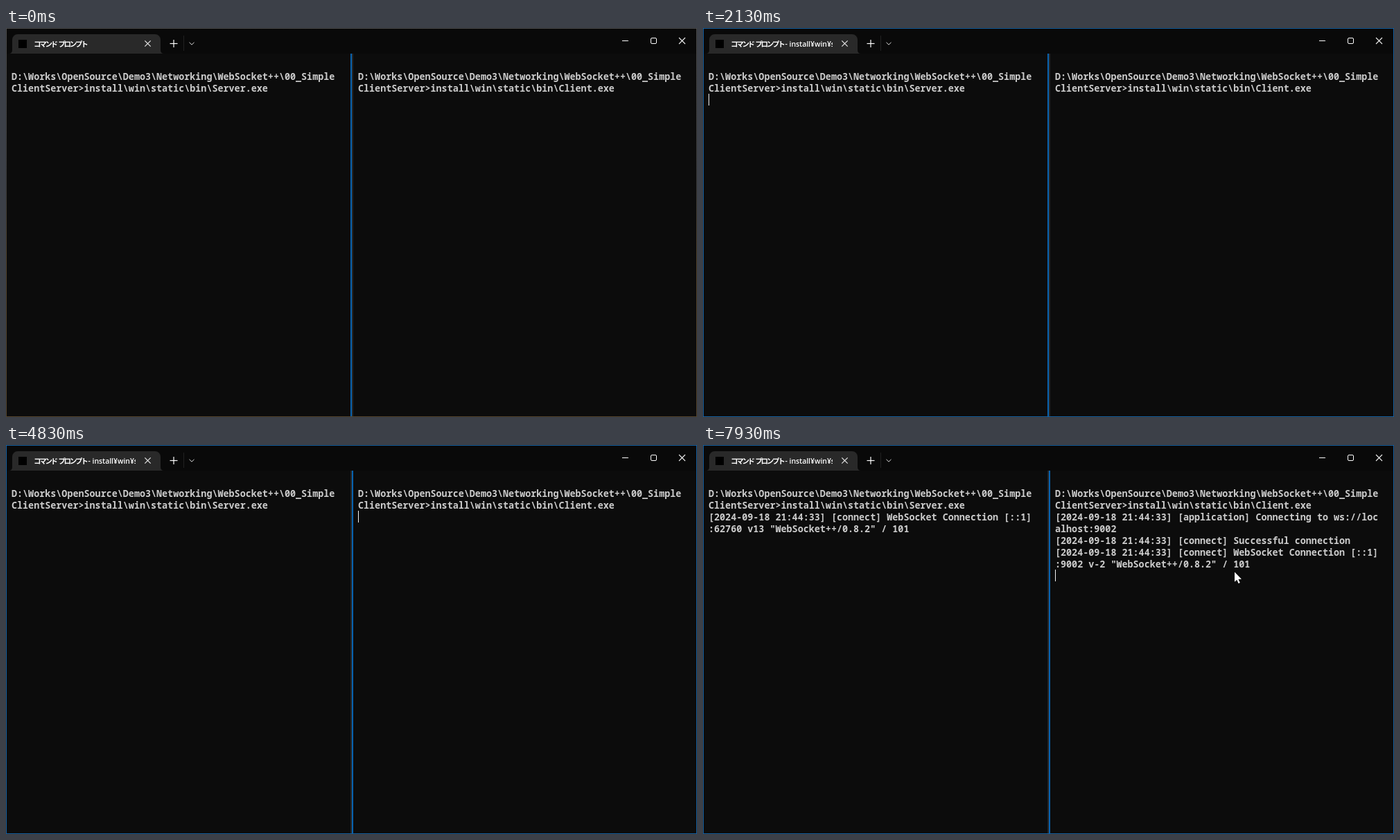
Write an HTML page with a canvas that moves like this. It is 997x562 px and loops after 8000 ms.

```html
<!DOCTYPE html>
<html lang="ja">
<head>
<meta charset="utf-8">
<title>Terminal</title>
<style>
  html, body { margin: 0; width: 100%; height: 100%; overflow: hidden; background: #0c0c0c; }
  canvas { display: block; }
</style>
</head>
<body>
<canvas id="stage" width="997" height="562"></canvas>
<script>
const W = 997, H = 562, LOOP = 8000;
const PITCH = 8.04, ROW = 17, TOP = 61;
const LEFT = 8, RIGHT = 508;
const MONO = '600 13.4px "Noto Sans Mono", "DejaVu Sans Mono", monospace';
const KANA = '700 10.5px "Noto Sans CJK JP", "Noto Sans CJK", sans-serif';
const LATIN = '600 10.4px "Open Sans", "Noto Sans", sans-serif';
const BLUE = '#0863b0', DIM = '#262626';

// Moments of the story, in ms
const FOCUS = 1310, RUN_SERVER = 2130, SWITCH = 3710, RUN_CLIENT = 4830, CONNECTED = 4920;
const BLINK = 540;

const ctx = document.getElementById('stage').getContext('2d');

const prompt = exe => [
  'D:\\Works\\OpenSource\\Demo3\\Networking\\WebSocket++\\00_Simple',
  'ClientServer>install\\win\\static\\bin\\' + exe
];
const stamp = '[2024-09-18 21:44:33] ';
const serverLog = [
  stamp + '[connect] WebSocket Connection [::1]',
  ':62760 v13 "WebSocket++/0.8.2" / 101'
];
const clientLog = [
  stamp + '[application] Connecting to ws://loc',
  'alhost:9002',
  stamp + '[connect] Successful connection',
  stamp + '[connect] WebSocket Connection [::1]',
  ':9002 v-2 "WebSocket++/0.8.2" / 101'
];
const cmdEnd = prompt('Server.exe')[1].length;

// Each glide eases out in even steps, may click, then hides
const glides = [
  { start: 590, end: 1090, steps: 5, from: [408, 480], to: [375.5, 57], click: FOCUS, release: 1500, hide: RUN_SERVER },
  { start: 3210, end: 3520, steps: 3, from: [442.5, 57], to: [654, 72.5], click: SWITCH, release: 3810, hide: RUN_CLIENT },
  { start: 7450, end: 7930, steps: 5, from: [668, 112], to: [767, 183.5], hide: LOOP }
];

// The caret stays lit for `hold` after each input, then blinks
const carets = [
  { start: FOCUS, pane: LEFT, col: cmdEnd, row: 1, hold: 600 },
  { start: RUN_SERVER, pane: LEFT, col: 0, row: 2, hold: 680 },
  { start: SWITCH, pane: RIGHT, col: cmdEnd, row: 1, hold: 500 },
  { start: RUN_CLIENT, pane: RIGHT, col: 0, row: 2, hold: 680 },
  { start: CONNECTED, pane: RIGHT, col: 0, row: 7, hold: 690 },
  { start: 7930, pane: RIGHT, col: 0, row: 7, hold: 680 }
];

const between = (t, a, b) => t >= a && t < b;

function rect(x, y, w, h, color) {
  ctx.fillStyle = color;
  ctx.fillRect(x, y, w, h);
}

function line(color, width, ...pts) {
  ctx.strokeStyle = color;
  ctx.lineWidth = width;
  ctx.beginPath();
  pts.forEach(([x, y]) => ctx.lineTo(x, y));
  ctx.stroke();
}

function cross(x, y, r) {
  line('#eee', 1.1, [x - r, y - r], [x + r, y + r]);
  line('#eee', 1.1, [x - r, y + r], [x + r, y - r]);
}

function text(str, x, y, font, color, spacing = 0, wordGap = 0) {
  ctx.font = font;
  ctx.letterSpacing = spacing + 'px';
  ctx.wordSpacing = wordGap + 'px';
  ctx.fillStyle = color;
  ctx.fillText(str, x, y);
}

function printRows(rows, x) {
  ctx.font = MONO;
  ctx.letterSpacing = ctx.wordSpacing = '0px';
  const gap = PITCH - ctx.measureText('M').width;
  rows.forEach((row, i) => text(row, x, TOP + 14 + i * ROW, MONO, '#ccc', gap));
}

function drawTab(running) {
  ctx.fillStyle = '#292929';
  ctx.beginPath();
  ctx.moveTo(4, 37);
  ctx.quadraticCurveTo(9, 37, 9, 32);
  ctx.arcTo(9, 9, 17, 9, 8);
  ctx.arcTo(223, 9, 223, 17, 8);
  ctx.lineTo(223, 32);
  ctx.quadraticCurveTo(223, 37, 228, 37);
  ctx.fill();

  rect(18, 17, 12, 12, '#000');
  ctx.save();
  ctx.beginPath();
  ctx.rect(38, 10, 149, 26);
  ctx.clip();
  text('コマンド プロンプト', 40, 26.5, KANA, '#fff', -2.3, 2.5);
  if (running) text('- install¥win¥static¥bin', 118.5, 26.5, LATIN, '#fff');
  ctx.restore();
  cross(204.5, 22.5, 4.2);
}

function drawTitleBar(running) {
  rect(0, 0, W, 37, '#090909');
  drawTab(running);
  line('#fff', 1.2, [236.5, 22.5], [247.5, 22.5]);
  line('#fff', 1.2, [242, 17], [242, 28]);
  line('#222', 1, [256.5, 11], [256.5, 33]);
  line('#ddd', 1, [264.5, 20.8], [268, 24.2], [271.5, 20.8]);
  line('#fff', 1, [889, 18.5], [898, 18.5]);
  ctx.beginPath();
  ctx.roundRect(930.5, 14.5, 8, 8, 1.5);
  ctx.stroke();
  cross(975.5, 18.5, 4.5);
}

function drawBorder(active) {
  let color = '#1560a0';
  if (!active) {
    color = ctx.createLinearGradient(0, 0, 0, H);
    color.addColorStop(0, '#4c4c4c');
    color.addColorStop(.4, '#3b3b3b');
    color.addColorStop(.6, '#54452d');
  }
  ctx.strokeStyle = color;
  ctx.lineWidth = 1;
  ctx.strokeRect(.5, .5, W - 1, H - 1);
}

function drawCaret(t) {
  const c = carets.findLast(c => t >= c.start);
  if (!c) return;
  const idle = t - c.start - c.hold;
  if (idle >= 0 && Math.floor(idle / BLINK) % 2 === 0) return;
  rect(Math.round(c.pane + c.col * PITCH), TOP + c.row * ROW, 1, ROW, '#f2f2f2');
}

function drawPointer(t) {
  const g = glides.find(g => between(t, g.start, g.hide));
  if (!g) return;
  const step = Math.floor((t - g.start) / (g.end - g.start) * g.steps + 1e-6);
  const u = Math.min(1, step / g.steps);
  const ease = 1 - (1 - u) ** 2;
  const [x, y] = g.from.map((a, i) => a + (g.to[i] - a) * ease);

  if (between(t, g.click, g.release)) {
    ctx.fillStyle = 'rgba(255,255,0,.48)';
    ctx.beginPath();
    ctx.arc(x, y, 10.5, 0, Math.PI * 2);
    ctx.fill();
  }
  ctx.save();
  ctx.translate(x, y);
  const arrow = new Path2D('M0 0V14.2L3.3 11.2L5.6 16.5L7.8 15.5L5.5 10.4L10 10.2Z');
  ctx.strokeStyle = 'rgba(0,0,0,.7)';
  ctx.lineWidth = 1.2;
  ctx.stroke(arrow);
  ctx.fillStyle = '#fff';
  ctx.fill(arrow);
  ctx.restore();
}

function draw(t) {
  const onRight = t >= SWITCH, connected = t >= CONNECTED;
  rect(0, 0, W, H, '#0c0c0c');
  drawTitleBar(between(t, RUN_SERVER, SWITCH) || t >= RUN_CLIENT);
  rect(497, 37, 2, 524, onRight ? DIM : BLUE);
  rect(499, 37, 2, 524, onRight ? BLUE : DIM);
  drawBorder(t >= FOCUS);

  printRows(prompt('Server.exe').concat(connected ? serverLog : []), LEFT);
  printRows(prompt('Client.exe').concat(connected ? clientLog : []), RIGHT);
  drawCaret(t);
  drawPointer(t);
}

const start = performance.now();
function tick() {
  draw((performance.now() - start) % LOOP);
  requestAnimationFrame(tick);
}
tick();
</script>
</body>
</html>
```
